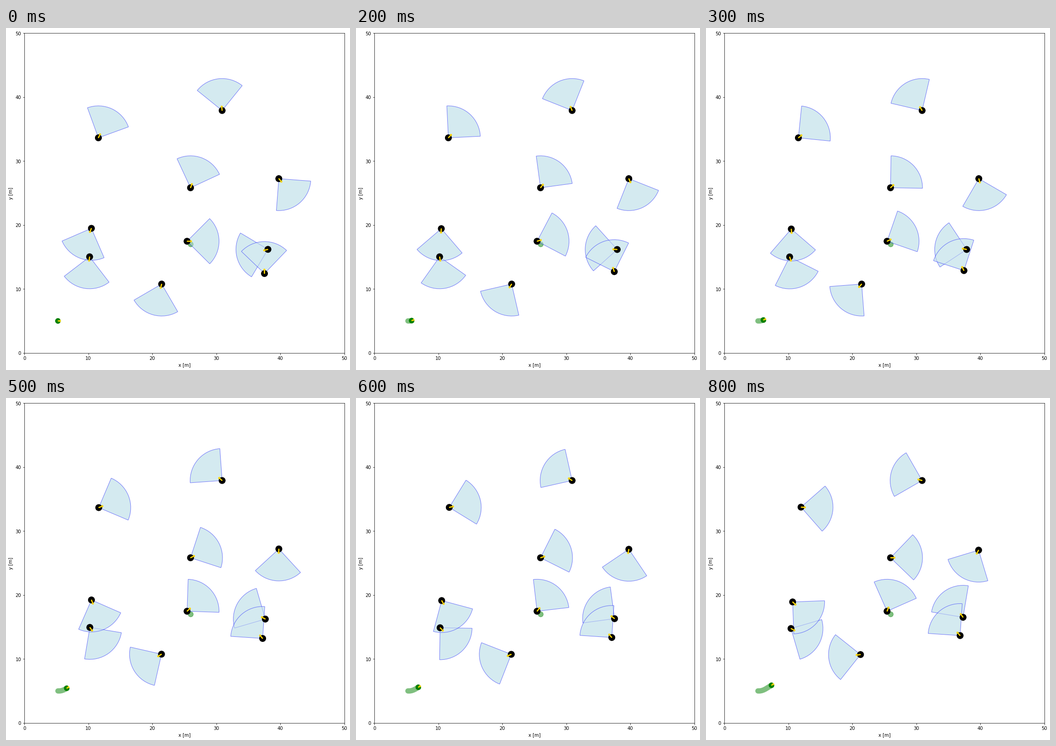
Write a matplotlib script that moves like this. It is 750 px wide and 746 px high and loops after 0.9 s.

```python
import numpy as np
import matplotlib.pyplot as plt
from matplotlib.animation import FuncAnimation
from matplotlib.patches import Circle, Polygon, Wedge

W, H, DPI = 750, 746, 72
STEPS, INTERVAL = 9, 100
TURN = np.degrees(0.15)      # heading change per step
TOP_SPEED = 0.2              # metres per step
FOV, VIEW = 90, 5
FILL = (0.832, 0.918, 0.942)

# x, y, heading, turn direction, acceleration, step at which it starts, last heading
ROBOTS = [
    (11.57, 33.65, 65.0, -1, 0.036, 3.6, None),
    (30.91, 37.92, 96.1, 1, 0, 0, None),
    (25.97, 25.84, 69.9, -1, 0, 0, None),
    (39.77, 27.27, -49.4, -1, 0.016, 3, None),
    (10.20, 15.05, 262.5, 1, 0.0168, 2, None),
    (10.48, 19.50, 248.4, 1, 0.0172, 0, None),
    (25.43, 17.48, 0.1, 1, 0, 0, None),
    (21.46, 10.79, 255.2, -1, 0.016, 3.5, None),
    (38.07, 16.21, 194.2, -1, 0.0168, -2, None),
    (37.53, 12.43, 91.2, 1, 0.0158, -8, 131.2),
]


def integrate(x, y, headings, speeds):
    """Positions reached by moving along each heading in turn."""
    ang = np.radians(headings[:-1])
    steps = np.column_stack([np.cos(ang), np.sin(ang)]) * speeds[1:, None]
    return np.vstack([[x, y], [x, y] + np.cumsum(steps, axis=0)])


def robot_path(x, y, heading, turn, acc, start, last):
    k = np.arange(STEPS)
    headings = heading + turn * TURN * k
    if last is not None:
        headings = np.minimum(headings, last)
    speeds = np.clip(acc * (k - start), 0, TOP_SPEED)
    return integrate(x, y, headings, speeds), headings


def arrow_points(pos, heading, length, width=0.6):
    shape = np.array([(0, .1), (0, -.1), (.8, -.1), (.8, -.3),
                      (1, 0), (.8, .3), (.8, .1)]) * (length, width)
    c, s = np.cos(np.radians(heading)), np.sin(np.radians(heading))
    return shape @ np.array([[c, s], [-s, c]]) + pos


class Body:
    """A round robot with a heading arrow and, optionally, a view sector."""

    def __init__(self, ax, path, headings, radius, color, arrow, view=True, z=0):
        self.path, self.headings, self.length = path, headings, arrow
        self.disc = ax.add_patch(Circle(path[0], radius, color=color, lw=1, zorder=5))
        self.arrow = ax.add_patch(Polygon(arrow_points(path[0], headings[0], arrow),
                                          color="gold", lw=1, zorder=6))
        self.sectors = []
        if view:
            for style in (dict(fc=FILL, ec="none", zorder=1),
                          dict(fc=FILL, ec="blue", alpha=0.5, lw=1, zorder=3 + z)):
                sector = Wedge(path[0], VIEW, 0, FOV, **style)
                self.sectors.append(ax.add_patch(sector))

    def place(self, k):
        pos, heading = self.path[k], self.headings[k]
        self.disc.set_center(pos)
        self.arrow.set_xy(arrow_points(pos, heading, self.length))
        for sector in self.sectors:
            sector.set_center(pos)
            sector.set_theta1(heading - FOV / 2)
            sector.set_theta2(heading + FOV / 2)


fig = plt.figure(figsize=((W + 0.01) / DPI, (H + 0.01) / DPI), dpi=DPI, facecolor="white")
ax = fig.add_axes([40 / W, (H - 709) / H, 697.5 / W, 697.5 / H])
ax.set(xlim=(0, 50), ylim=(0, 50), xlabel="x [m]", ylabel="y [m]",
       xticks=range(0, 51, 10), yticks=range(0, 51, 10))

bodies = [Body(ax, *robot_path(*r), 0.5, "black", 0.75, z=0.01 * i)
          for i, r in enumerate(ROBOTS)]

# The green robot bends upwards, then drives straight to the goal.
ramp = np.minimum(np.arange(STEPS) / 5, 1)
green_turn = 32 * np.sin(ramp * np.pi / 2)
green_path = integrate(5.25, 5.02, green_turn, np.full(STEPS, 0.293))
bodies.append(Body(ax, green_path, green_turn, 0.4, "green", 0.42, view=False))

ax.add_patch(Circle((26, 17), 0.4, color="green", alpha=0.5, lw=1, zorder=2))
trail, = ax.plot([], [], color="green", alpha=0.5, lw=11.6, zorder=2,
                 solid_capstyle="round", solid_joinstyle="round")


def update(k):
    for body in bodies:
        body.place(k)
    seen = green_path[:k + 1] if k else np.empty((0, 2))
    trail.set_data(seen[:, 0], seen[:, 1])
    return []


anim = FuncAnimation(fig, update, frames=STEPS, interval=INTERVAL,
                     init_func=lambda: update(0), repeat=True, repeat_delay=0)
plt.show()
```
